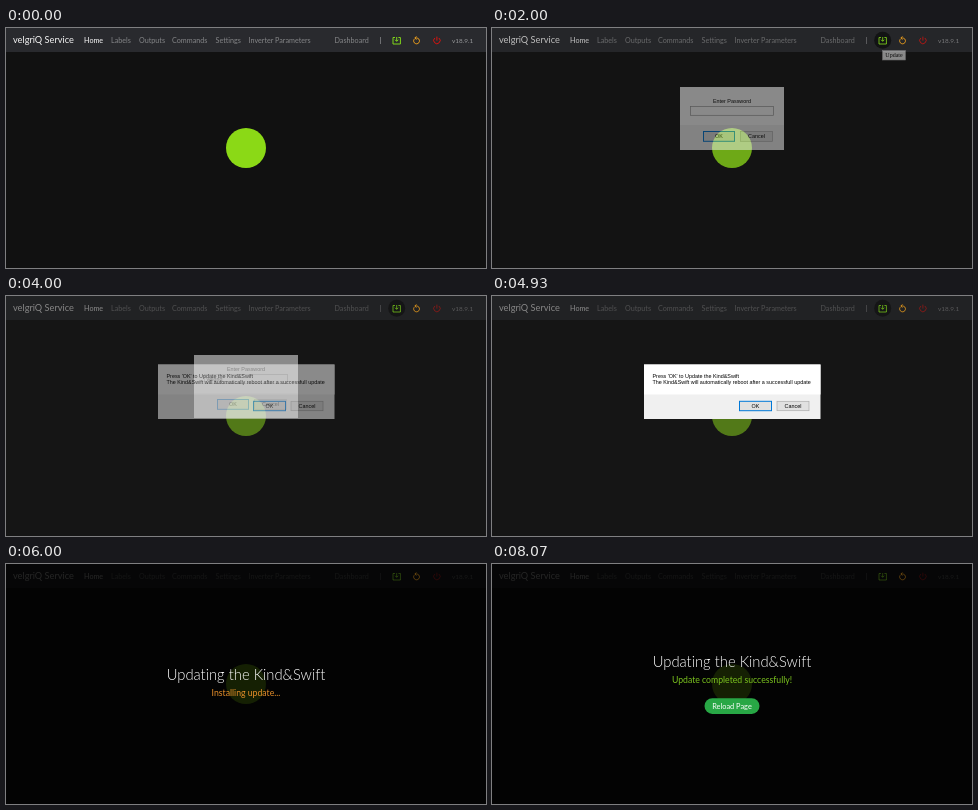
These frames come from a looping animation (480x240 px, 8990 ms). An HTML page:

```html
<!DOCTYPE html>
<html lang="en">
<head>
<meta charset="utf-8">
<title>Service update</title>
<style>
html, body { margin: 0; width: 100%; height: 100%; overflow: hidden; background: #111; }
svg { display: block; width: 480px; height: 240px; }
text { font-family: Lato, "Open Sans", sans-serif; font-size: 7.2px; font-variant-ligatures: none; }
.links { fill: #858688; }
.mid { text-anchor: middle; }
.icon { fill: none; stroke-width: 1; }
.dialog text { font-family: "Liberation Sans", Arial, sans-serif; font-size: 5.4px; fill: #000; }
.button { fill: #e1e1e1; stroke: #adadad; stroke-width: .7; }
.default { stroke: #0078d7; stroke-width: 1; }
</style>
</head>
<body>
<svg viewBox="0 0 480 240">
  <rect width="480" height="240" fill="#111"/>
  <rect width="480" height="24" fill="#292a2e"/>
  <circle cx="240" cy="120" r="20" fill="#8bd916"/>
  <g class="links">
    <text x="7" y="15.3" fill="#f4f4f4" style="font-size:9.2px">velgriQ Service</text>
    <text x="78" y="15" fill="#fff">Home</text>
    <text x="105" y="15">Labels</text>
    <text x="133" y="15">Outputs</text>
    <text x="166" y="15">Commands</text>
    <text x="209.5" y="15">Settings</text>
    <text x="242.5" y="15">Inverter Parameters</text>
    <text x="328.5" y="15">Dashboard</text>
    <path d="M374.5 9v7" stroke="#8d8e90" stroke-width=".7"/>
    <text x="446" y="15" fill="#9a9b9d" style="font-size:6.4px">v18.9.1</text>
  </g>
  <circle id="hover" cx="390.7" cy="12.3" r="8.5" fill="#101112"/>
  <rect id="shade" width="480" height="240"/>

  <g class="icon">
    <path id="save" stroke="#7fd41a" d="M389 9.5h-2v6.5h7.4v-6.5h-2M390.7 9v4M389 11.7l1.7 1.7 1.7-1.7"/>
    <path id="reboot" stroke="#f5a31c" d="M408.2 11.2a2.9 2.9 0 1 0 2.4-1.2h-1.6M410.4 8.4l-1.6 1.6 1.6 1.6"/>
    <path id="power" stroke="#d8140f" d="M428.9 10a3.2 3.2 0 1 0 4 0M430.9 8.6v4"/>
  </g>

  <g id="tip">
    <rect x="390.5" y="22.5" width="23" height="9.5" fill="#fff" stroke="#bbb" stroke-width=".6"/>
    <text class="mid" x="402" y="29.3" style="font:6px 'Liberation Serif',serif">Update</text>
  </g>

  <g id="prompt" class="dialog">
    <rect x="188" y="59" width="104" height="63" fill="#f0f0f0"/>
    <rect x="188" y="59" width="104" height="38" fill="#fff"/>
    <text class="mid" x="240" y="74.5">Enter Password</text>
    <rect x="198.5" y="78.5" width="83" height="8.8" fill="#fff" stroke="#999" stroke-width=".7"/>
    <text id="password" x="200.5" y="84.8">velgriq</text>
    <rect class="button default" x="211.5" y="103.5" width="31" height="9.8"/>
    <rect class="button" x="248.5" y="103.5" width="32" height="9.8"/>
    <text class="mid" x="227" y="110.3">OK</text>
    <text class="mid" x="264.5" y="110.3">Cancel</text>
  </g>

  <g id="confirm" class="dialog">
    <rect x="152" y="68.5" width="176.5" height="54.5" fill="#f0f0f0"/>
    <rect x="152" y="68.5" width="176.5" height="30" fill="#fff"/>
    <text x="160.5" y="82">Press 'OK' to Update the Kind&amp;Swift</text>
    <text x="160.5" y="88.4">The Kind&amp;Swift will automatically reboot after a successfull update</text>
    <rect class="button default" x="247.5" y="105.3" width="32" height="9.4"/>
    <rect class="button" x="285" y="105.3" width="32" height="9.4"/>
    <text class="mid" x="263.5" y="112">OK</text>
    <text class="mid" x="301" y="112">Cancel</text>
  </g>

  <g id="progress" class="mid">
    <text x="240" y="116" fill="#fff" style="font-size:14.8px;font-weight:300">Updating the Kind&amp;Swift</text>
    <text id="status" x="240" y="131.7" style="font-size:8.7px"></text>
    <g id="reload">
      <rect x="212.5" y="147.3" width="55" height="15.6" rx="7.8" fill="#28a745"/>
      <text x="240" y="157.6" fill="#fff" style="font-size:7.4px">Reload Page</text>
    </g>
  </g>
</svg>
<script>
const LOOP = 8990, STEP = 70;
const $ = id => document.getElementById(id);
const fade = (id, alpha) => $(id).setAttribute("opacity", alpha);

// Two-step fade: half visible for one step, then fully visible
const rise = (t, start) => t < start ? 0 : t < start + STEP ? .5 : 1;

function draw(t) {
  const updating = t >= 5000, done = t >= 8000;
  const modal = rise(t, 2000);
  const dim = (inModal, inUpdate) => updating ? inUpdate : 1 - modal * (1 - inModal);

  fade("hover", updating ? 0 : rise(t, 1000));
  fade("tip", rise(t, 1000) - modal);
  fade("shade", updating ? .85 : modal * .5);
  $("shade").setAttribute("fill", updating ? "#000" : "#1b1b1b");
  fade("save", dim(.7, .27));
  fade("reboot", dim(.8, .33));
  fade("power", dim(.5, .17));

  fade("prompt", modal - rise(t, 4000));
  fade("password", +(t >= 3000));
  fade("confirm", updating ? 0 : rise(t, 4000));

  fade("progress", +updating);
  fade("reload", +done);
  $("progress").setAttribute("transform", `translate(0 ${done ? -13 : 0})`);
  $("status").setAttribute("fill", done ? "#7cc41f" : "#e8902a");
  $("status").textContent = done ? "Update completed successfully!"
    : (t < 6000 ? "Downloading" : t < 7000 ? "Installing" : "Finishing") + " update...";
}

const begin = performance.now();
function tick() {
  draw((performance.now() - begin) % LOOP);
  requestAnimationFrame(tick);
}
tick();
</script>
</body>
</html>
```
